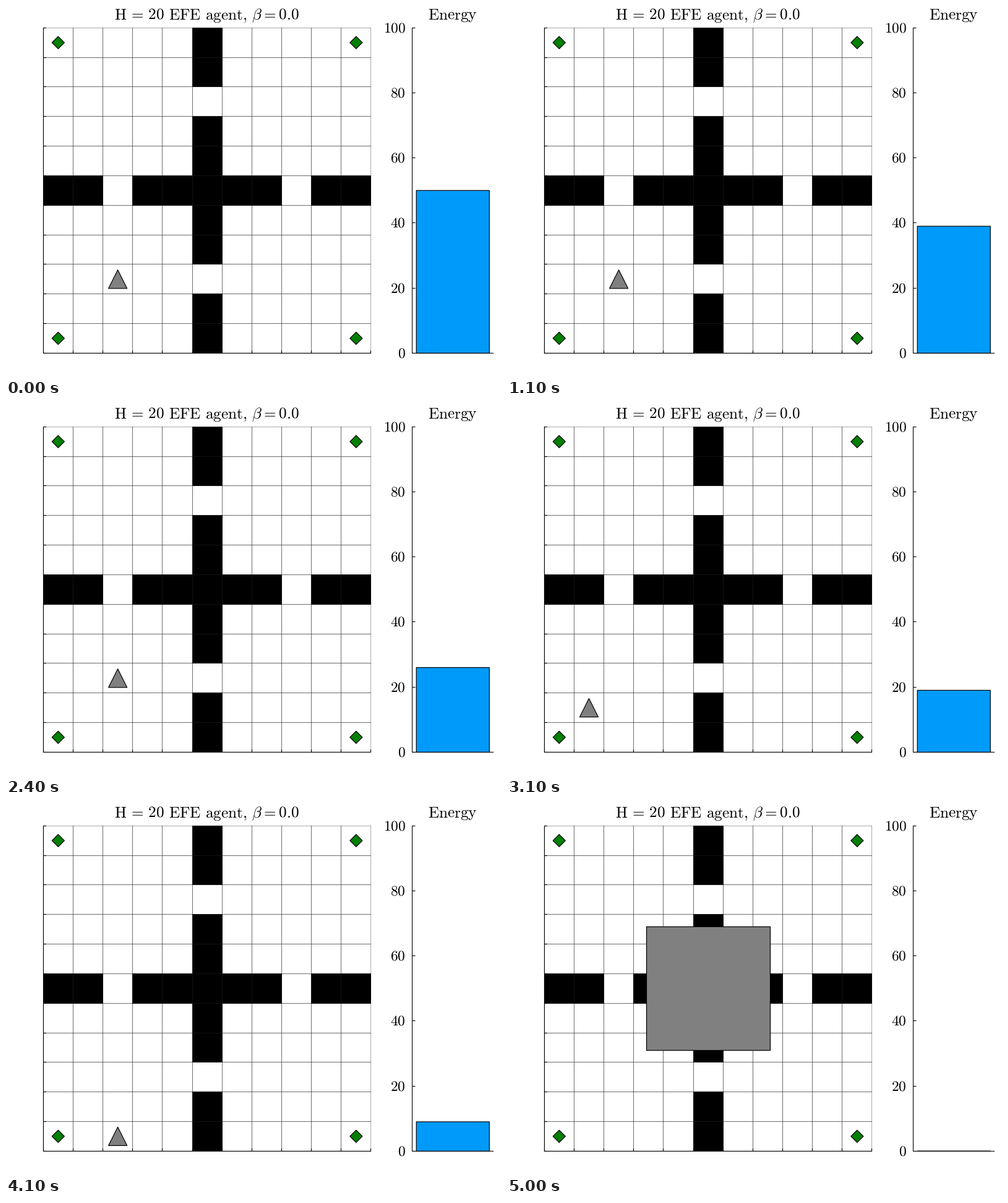
Write a matplotlib script that moves like this. It is 800x600 px and loops after 5.2 s.

```python
import math
from itertools import accumulate

import matplotlib.pyplot as plt
from matplotlib.animation import FuncAnimation
from matplotlib.patches import Polygon, Rectangle

plt.rcParams.update({"mathtext.fontset": "cm", "text.hinting": "none"})

W, H, DPI = 800, 600, 100
PT = 72 / DPI  # points per pixel
N = 11  # cells per side
LEFT, CELL_W = 60.25, 48.155
TOP, CELL_H = 35.3, 47.82
BOTTOM = TOP + N * CELL_H
BAR_AXIS, BAR_AXIS_END = 656.5, 788
BAR_LEFT, BAR_RIGHT = 663.2, 781.2
UNIT = (BOTTOM - TOP) / 100
START_ENERGY = 50

STEP = {"U": (0, 1), "D": (0, -1), "L": (-1, 0), "R": (1, 0), ".": (0, 0)}
MOVES = (".LULD." "URD.R." "LDRU.U" "LDDRU." "UULDD."
         "DDUL.." "RD.R.U" "U.R.UU" "L")

fig = plt.figure(figsize=(W / DPI, H / DPI), dpi=DPI, facecolor="white")
ax = fig.add_axes([0, 0, 1, 1])
ax.set_xlim(0, W)
ax.set_ylim(H, 0)
ax.axis("off")


def mid(v):
    """Centre of the pixel that holds v."""
    return math.floor(v) + 0.5


def line(x0, y0, x1, y1, color="black", alpha=1.0, z=3):
    ax.plot([x0, x1], [y0, y1], color=color, alpha=alpha, lw=1.1 * PT,
            solid_capstyle="butt", snap=False, zorder=z)


def shape(points, color, z):
    patch = Polygon(points, closed=True, fc=color, ec="black", lw=1.2 * PT,
                    joinstyle="round", snap=False, zorder=z)
    return ax.add_patch(patch)


def text(x, y, s, size, ha):
    ax.text(x, y, f"${s}$", fontsize=size * PT, ha=ha, va="baseline")


def col_x(c):
    return LEFT + c * CELL_W


def row_y(r):
    return BOTTOM - r * CELL_H


def center(c, r):
    return col_x(c + 0.5), row_y(r + 0.5)


def draw_walls():
    for c in range(N):
        for r in range(N):
            if (c == 5 and r not in (2, 8)) or (r == 5 and c not in (2, 8)):
                x0, x1 = math.floor(col_x(c)), math.floor(col_x(c + 1)) + 1
                y0, y1 = math.floor(row_y(r + 1)), math.floor(row_y(r)) + 1
                ax.add_patch(Rectangle((x0, y0), x1 - x0, y1 - y0, fc="black",
                                       lw=0, snap=False, zorder=1))


def draw_grid():
    x0, x1 = math.floor(LEFT), math.floor(col_x(N)) + 1
    y0, y1 = math.floor(TOP), math.floor(BOTTOM) + 1
    for k in range(N + 1):
        x, y = mid(col_x(k)), mid(row_y(k))
        alpha = 0.35 if k == N else 0.6
        line(x, y0, x, y1, "0.12", alpha, 2)
        line(x0, y, x1, y, "0.12", alpha, 2)
        line(x, y1 - 5, x, y1)
        line(x0, y, x0 + 5, y)
    line(mid(LEFT), y0, mid(LEFT), y1)
    line(x0, mid(BOTTOM), x1, mid(BOTTOM))


def draw_energy_axis():
    line(BAR_AXIS, math.floor(TOP), BAR_AXIS, math.floor(BOTTOM) + 1)
    line(BAR_AXIS - 0.5, mid(BOTTOM), BAR_AXIS_END, mid(BOTTOM))
    for value in range(0, 101, 20):
        y = BOTTOM - value * UNIT
        line(BAR_AXIS, mid(y), BAR_AXIS + 5, mid(y))
        text(645.8, y + 8, str(value), 23.4, "right")


def draw_titles():
    gap = r"\hspace{0.38}"
    words = gap.join([r"\mathrm{H}\,=\,\mathrm{20}", r"\mathrm{EFE}",
                      r"\mathrm{agent,}"])
    text(324.3, 22.3, words + r"\hspace{0.18}\beta=0.0", 25.2, "center")
    text(721.8, 22.3, r"\mathrm{Energy}", 25.2, "center")


def triangle(c, r):
    x, y = center(c, r)
    return [(x, y - 15), (x + 15, y + 15), (x - 15, y + 15)]


def diamond(c, r, d=10):
    x, y = center(c, r)
    return [(x, y - d), (x + d, y), (x, y + d), (x - d, y)]


def bar_box(energy):
    y = BOTTOM - energy * UNIT
    return [(BAR_LEFT, y), (BAR_RIGHT, y),
            (BAR_RIGHT, mid(BOTTOM)), (BAR_LEFT, mid(BOTTOM))]


draw_walls()
draw_grid()
draw_energy_axis()
draw_titles()
for corner in ((0, 0), (0, N - 1), (N - 1, 0), (N - 1, N - 1)):
    shape(diamond(*corner), "#008000", 4)

path = list(accumulate((STEP[m] for m in MOVES),
                       lambda p, d: (p[0] + d[0], p[1] + d[1]),
                       initial=(2, 2)))
agent = shape(triangle(*path[0]), "#808080", 5)
bar = shape(bar_box(START_ENERGY), "#009afa", 2)
cx, cy = (mid(v) for v in center(5, 5))
cover = shape([(cx - 100, cy - 100), (cx + 100, cy - 100),
               (cx + 100, cy + 100), (cx - 100, cy + 100)], "#808080", 6)


def update(i):
    t = min(i, START_ENERGY)
    agent.set_xy(triangle(*path[min(t, len(path) - 1)]))
    bar.set_xy(bar_box(START_ENERGY - t))
    done = t == START_ENERGY
    agent.set_visible(not done)
    cover.set_visible(done)
    return agent, bar, cover


anim = FuncAnimation(fig, update, frames=52, interval=100, repeat=True,
                     repeat_delay=0, blit=False)
plt.show()
```
